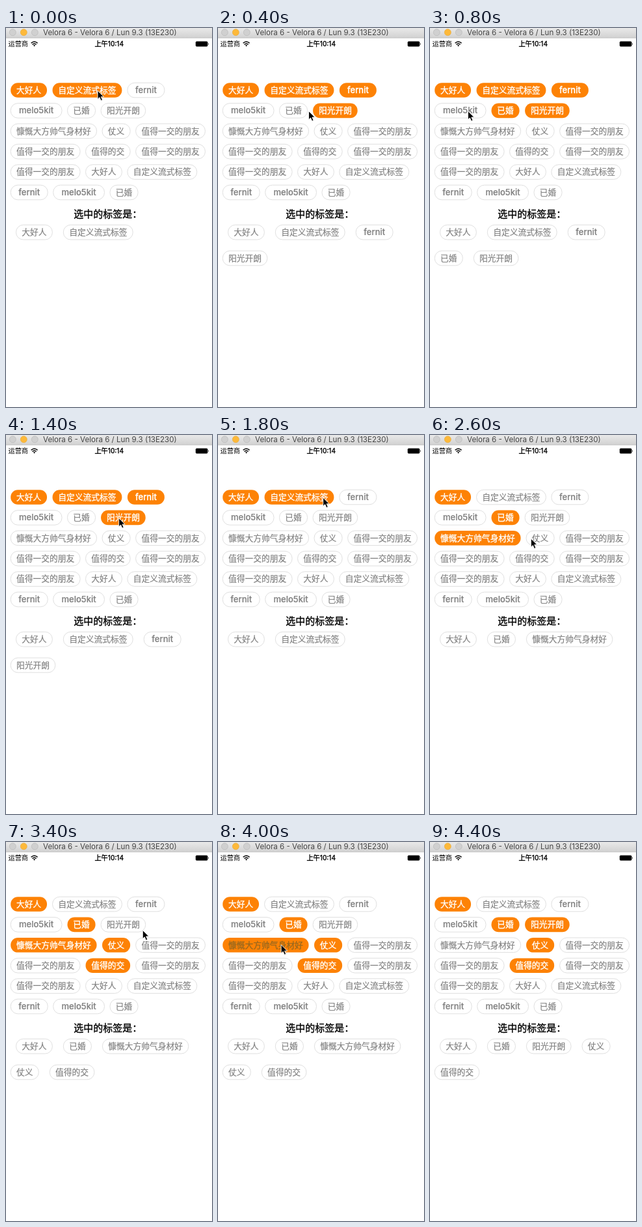
An HTML page for the animation above (4.8 s loop, 317 by 582 pixels).

```html
<!DOCTYPE html>
<html lang="zh-CN">
<head>
<meta charset="utf-8">
<style>
html, body { margin: 0; width: 100%; height: 100%; overflow: hidden; background: #fff; }
svg { display: block; width: 317px; height: 582px; }
text { font-family: Inter, "Noto Sans CJK SC", "Noto Sans CJK", sans-serif; }
.medium { stroke: #000; stroke-width: .35; }
.pill rect { fill: #fff; stroke: #dcdcdc; stroke-width: .9; }
.pill text { font-size: 12.75px; fill: #818181; stroke: #818181; stroke-width: .2; text-anchor: middle; }
.pill .latin { font-size: 13px; font-weight: 500; }
.on rect { fill: #fd8205; stroke: none; }
.on text { fill: #fff; stroke: #fff; stroke-width: .35; }
.pressed text { fill: #99691f; stroke: #99691f; }
</style>
</head>
<body>
<svg viewBox="0 0 317 582">
  <defs>
    <linearGradient id="bar" x2="0" y2="1">
      <stop stop-color="#e9e9e9"/><stop offset="1" stop-color="#d2d2d2"/>
    </linearGradient>
  </defs>
  <rect width="317" height="582" fill="#fff"/>
  <rect width="317" height="15" fill="url(#bar)"/>
  <path d="M0 15.2H317" stroke="#b5b5b5" stroke-width=".8"/>
  <g stroke-width=".7">
    <circle cx="10.3" cy="6.7" r="5" fill="#d0d0d0" stroke="#b9b9b9"/>
    <circle cx="27.3" cy="6.7" r="5" fill="#fdb93a" stroke="#e8ab3c"/>
    <circle cx="44.3" cy="6.7" r="5" fill="#d0d0d0" stroke="#b9b9b9"/>
  </g>
  <text x="57" y="10.8" font-size="11.6" fill="#454545">Velora 6 - Velora 6 / Lun 9.3 (13E230)</text>

  <text x="3.5" y="28" font-size="10.2">运营商</text>
  <g fill="none" stroke="#000" stroke-width="1.5">
    <path d="M38.6 23.3Q43.6 18.6 48.6 23.3M40.6 25.4Q43.6 22.6 46.6 25.4"/>
    <path d="M42 26.6Q43.6 25.4 45.2 26.6L43.6 28.4Z" fill="#000" stroke="none"/>
  </g>
  <text class="medium" x="158.7" y="28" font-size="10.2" text-anchor="middle">上午10:14</text>
  <rect x="291.8" y="20.6" width="18.6" height="7.8" rx="1.6"/>
  <path d="M311.2 23Q313 24.6 311.2 26.2Z"/>

  <g id="tags"></g>
  <text class="medium" x="104.3" y="290.7" font-size="15">选中的标签是：</text>
  <g id="chosen"></g>
  <path id="cursor" d="M0 0V13.2L3 10.4L5.1 15.4L7.5 14.4L5.4 9.5H9.5Z" stroke="#fff" stroke-width=".9"/>
</svg>
<script>
const STEP = 200, LOOP = 4800, LEFT = 7.2, PILL_H = 22.6;
const friend = '值得一交的朋友';
const tags = ['大好人', '自定义流式标签', 'fernit', 'melo5kit', '已婚', '阳光开朗',
  '慷慨大方帅气身材好', '仗义', friend, friend, '值得的交', friend,
  friend, '大好人', '自定义流式标签', 'fernit', 'melo5kit', '已婚'];
const latinWidth = { fernit: 57, melo5kit: 78.8 };

const hover = (time, tag) => [{ time, tag }];
// Taps one step apart; each shows its effect half a step after the pointer arrives
const tap = (start, ...list) => list.map((tag, i) => ({ time: start + i, tag, tap: true }));
const route = [
  hover(0, 1), tap(.5, 2, 5, 4), hover(3, 4), hover(4, 3), hover(5, 3),
  tap(6.5, 4, 5, 2, 1, 4), tap(12.5, 6, 7, 10), hover(15, 10),
  hover(16, 8), hover(18, 5), tap(20.5, 6, 5)
].flat();
const firstPress = route.find(stop => stop.time === 20.5);
const leaveTime = route.at(-1).time;

const $ = id => document.getElementById(id);

function flow(labels, { x, y, gap, pitch, limit }) {
  return labels.map(label => {
    const w = latinWidth[label] || label.length * 12.75 + 17.6;
    if (x + w > limit) { x = LEFT; y += pitch; }
    const box = { label, x, y, w };
    x += w + gap;
    return box;
  });
}

function pill({ label, x, y, w }, state = '') {
  const kind = label in latinWidth ? 'latin' : '';
  return `<g class="pill ${state}"><rect x="${x}" y="${y}" width="${w}" height="${PILL_H}" rx="11"/>` +
    `<text class="${kind}" x="${x + w / 2}" y="${y + 15.6}">${label}</text></g>`;
}

const boxes = flow(tags, { x: LEFT, y: 84.2, gap: 8.5, pitch: 31.4, limit: 310 });

function pointerAt(step) {
  const next = route.find(stop => stop.time > step);
  const last = route.findLast(stop => stop.time <= step);
  const u = (step - last.time) / (next.time - last.time);
  const eased = u * (2 - u);
  const a = boxes[last.tag], b = boxes[next.tag];
  const mix = (from, to) => from + (to - from) * eased;
  return [mix(a.x + a.w * .65, b.x + b.w * .65), mix(a.y, b.y) + 12];
}

function draw(step) {
  const on = new Set([0, 1]);
  for (const stop of route)
    if (stop.tap && stop.time < step && !on.delete(stop.tag)) on.add(stop.tag);

  const pressed = Math.floor(firstPress.time) === step ? firstPress.tag : -1;
  $('tags').innerHTML = boxes.map((box, i) =>
    pill(box, (on.has(i) ? 'on' : '') + (i === pressed ? ' pressed' : ''))).join('');
  const chosen = tags.filter((_, i) => on.has(i));
  $('chosen').innerHTML = flow(chosen, { x: 15.5, y: 302.4, gap: 17, pitch: 39.8, limit: 301 })
    .map(box => pill(box)).join('');

  const visible = step < leaveTime;
  $('cursor').style.display = visible ? '' : 'none';
  if (visible) $('cursor').setAttribute('transform', `translate(${pointerAt(step)})`);
}

let shown = -1;
function tick() {
  const step = Math.floor(performance.now() % LOOP / STEP);
  if (step !== shown) draw(shown = step);
  requestAnimationFrame(tick);
}
tick();
</script>
</body>
</html>
```
